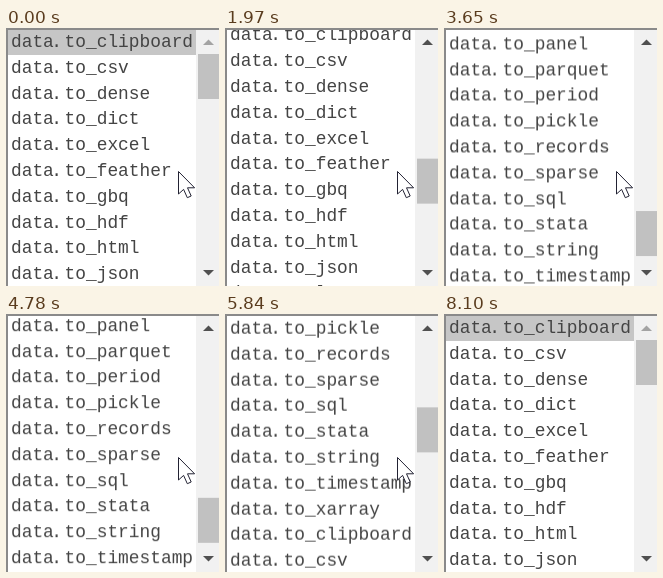
An HTML page for the animation above (8730 ms loop, 213 px wide and 258 px high).

```html
<!DOCTYPE html>
<html lang="en">
<head>
<meta charset="utf-8">
<title>Scrolling method list</title>
<style>
  html, body { margin: 0; width: 100%; height: 100%; overflow: hidden; background: #fff; }
  #stage { position: relative; width: 213px; height: 258px; overflow: hidden; background: #fff; }
  #view { position: absolute; left: 2px; top: 2px; width: 188px; height: 256px; overflow: hidden; }
  #list { font: 17.85px/25.8px "Liberation Mono", monospace; color: #444; will-change: transform; }
  .row { height: 25.8px; padding-left: 3px; white-space: pre; }
  .row:first-child { background: linear-gradient(#c6c6c6 25px, transparent 0); }
  .dot { position: relative; left: -2.5px; }
  #bar { position: absolute; left: 190px; top: 2px; width: 23px; height: 256px; background: #f1f1f1; }
  #thumb { position: absolute; left: 192px; top: 26px; width: 21px; height: 45px; background: #c1c1c1; }
  #edge { position: absolute; inset: 0; border: solid #8a8a8a; border-width: 2px 0 0 2px; }
  svg { position: absolute; left: 0; top: 0; }
</style>
</head>
<body>
<div id="stage">
  <div id="view"><div id="list"></div></div>
  <div id="bar"></div>
  <div id="thumb"></div>
  <div id="edge"></div>
  <svg width="213" height="258" viewBox="0 0 213 258">
    <path id="up" d="M197 17 L202.5 11.5 L208 17 Z"/>
    <path id="down" d="M197 242 L202.5 247.5 L208 242 Z"/>
    <path id="cursor" d="M172.5 143.5 V166 L177.6 161.4 L181.3 169.7 L185.2 168 L181.5 159.8 H188.6 Z"
          fill="#fff" stroke="#223"/>
  </svg>
</div>
<script>
const DURATION = 8730;
const MAX_SCROLL = 927;
const THUMB_RATIO = 0.1744;
const FRAME_LEAD = 12; // ms by which frames run ahead of even spacing
const $ = id => document.getElementById(id);

const names = ('clipboard csv dense dict excel feather gbq hdf html json latex msgpack ' +
  'panel parquet period pickle records sparse sql stata string timestamp xarray').split(' ');

$('list').innerHTML = [...names, ...names]
  .map(name => `<div class="row">data<span class="dot">.</span>to_${name}</div>`)
  .join('');

const smooth = u => (1 - Math.cos(Math.PI * u)) / 2;
const settle = u => 1 - (1 - u) ** 3.4;
const accelerate = u => u * u;

const wheelBursts = [
  { start: 710, end: 850, steps: 3, to: 150 },
  { start: 1480, end: 1970, steps: 9, to: 600 },
  { start: 2710, end: 2900, steps: 4, to: 750 },
  { start: 3530, end: 3920, steps: 7, to: MAX_SCROLL, ease: settle },
  { start: 4780, end: 5160, steps: 7, to: 480 },
  { start: 5720, end: 6310, steps: 10, to: 25.6 },
  { start: 6860, end: 6990, steps: 3, to: 0 }
];
const pointerExit = [{ start: 7920, end: 8100, steps: 4, to: 1, ease: accelerate }];

// Turns eased moves into [time, value] samples, each held until the next.
function sample(bursts) {
  const samples = [[0, 0]];
  let from = 0;
  for (const { start, end, steps, to, ease = smooth } of bursts) {
    const gap = (end - start) / (steps - 1);
    for (let i = 0; i < steps; i++) {
      const time = start + Math.max(0, i * gap - FRAME_LEAD);
      samples.push([time, from + (to - from) * ease((i + 1) / steps)]);
    }
    from = to;
  }
  return samples;
}

function play(id, samples, toStyle) {
  const frames = samples.map(([time, value]) =>
    ({ offset: time / DURATION, easing: 'step-end', ...toStyle(value) }));
  frames.push({ ...frames.at(-1), offset: 1 });
  $(id).animate(frames, { duration: DURATION, iterations: Infinity });
}

const arrowFill = disabled => ({ fill: disabled ? '#a3a3a3' : '#505050' });
const scroll = sample(wheelBursts);

play('list', scroll, y => ({ transform: `translateY(${-y}px)` }));
play('thumb', scroll, y => ({ transform: `translateY(${y * THUMB_RATIO}px)` }));
play('up', scroll, y => arrowFill(y < 1));
play('down', scroll, y => arrowFill(y > MAX_SCROLL - 1));
play('cursor', sample(pointerExit), u => ({ transform: `translate(${60 * u}px, ${130 * u}px)` }));
</script>
</body>
</html>
```
